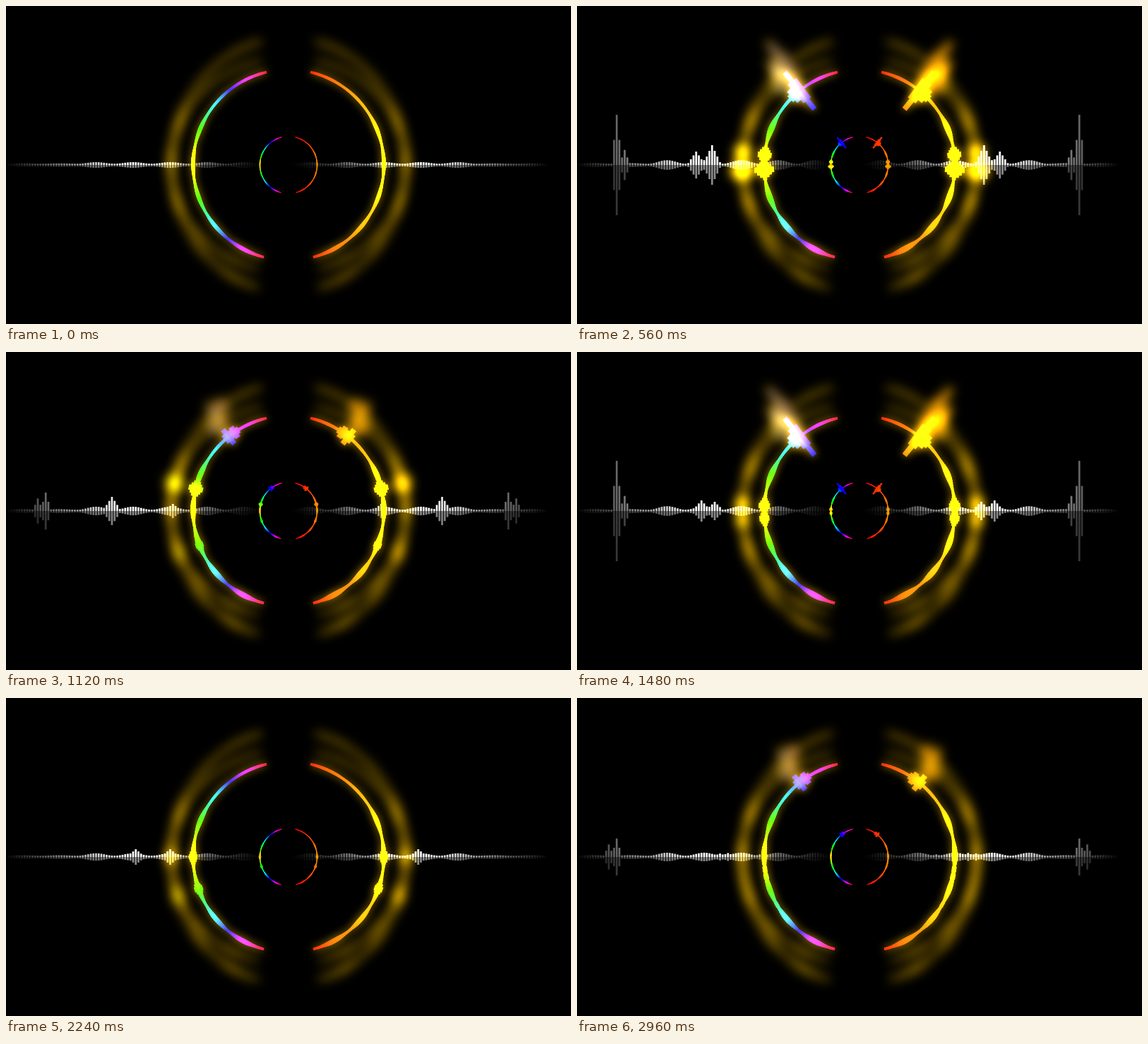
An HTML page with a canvas for the animation above (3000 ms loop, 800 by 450 pixels).

```html
<!DOCTYPE html>
<html lang="en">
<head>
<meta charset="utf-8">
<title>Spectrum rings</title>
<style>
html, body { margin: 0; width: 100%; height: 100%; overflow: hidden; background: #000; }
canvas { display: block; width: 800px; height: 450px; }
</style>
</head>
<body>
<canvas id="stage" width="800" height="450"></canvas>
<script>
const W = 800, H = 450, LOOP = 3000, STEP = 40;
const BARS = 100, PITCH = 3.75, RADIUS = 135, REST = 1.8, KICK = 71;
const ctx = document.getElementById('stage').getContext('2d');
const buffer = Object.assign(document.createElement('canvas'), { width: W, height: H });
const off = buffer.getContext('2d');

const clamp = v => Math.max(0, Math.min(1, v));
const beats = Array.from({ length: 7 }, (_, n) => STEP * Math.round((110 + 453 * n) / STEP));

function random(a, b) {
  const v = Math.sin(a * 127.1 + b * 311.7) * 43758.5453;
  return v - Math.floor(v);
}

// Melody: time, bar, height
const notes = [
  [560, 51, 28], [560, 45, 19], [1120, 40, 20], [1120, 63, 10],
  [1480, 47, 15], [1480, 52, 13], [1920, 61, 18], [1920, 65, 16],
  [2240, 49, 11], [2240, 62, 11]
];
// Softer notes between the beats
beats.forEach((b, n) => {
  for (let k = 0; k < 3; k++)
    notes.push([b + 200, 33 + 3 * Math.floor(13 * random(n, k)), 8 + 14 * random(k, n + 9)]);
});

function kick(e) {
  if (e >= 240) return [];
  const late = clamp(e / 120);
  return [
    [12, KICK * 0.25 * late, 2],
    [15, KICK / (1 + e / 70), 2],
    [18, KICK * 0.3 * (1 - late), 2]
  ];
}

function spectrum(t) {
  const sinceBeat = t - Math.max(-LOOP, ...beats.filter(b => b <= t));
  const loud = 0.45 + 0.55 * Math.exp(-sinceBeat / 400);
  const peaks = kick(sinceBeat);
  for (const [at, bar, h] of notes)
    peaks.push([bar, h * clamp(1 - Math.abs(t - at) / 110), 3.5]);
  return Array.from({ length: BARS }, (_, n) => {
    const i = n - 1;
    const swell = (i < 27 ? 1 : 5) * loud * Math.cos(Math.PI * (i - 76) / 14) ** 2;
    return Math.max(REST + swell, ...peaks.map(([c, h, w]) => h * (1 - Math.abs(i - c) / w)));
  });
}

// Colours by side and by distance from the horizontal, 0 to 1
const hue = (h, light = 50) => `hsl(${h},100%,${light}%)`;
const gold = () => '#ffc400';
const mainColor = (side, a) => hue(side < 0 ? 55 + 297 * a ** 1.2 : 53 * (1 - a ** 1.5), 53);
const smallColor = (side, a) => hue(side < 0 ? 42 + 303 * a : 38 * (1 - a));

function ring(g, bars, color, sx, sy, trim = 0) {
  for (const side of [-1, 1]) {
    bars.forEach((h, n) => {
      const half = 1 + 0.46 * h - trim;
      if (half <= 0) return;
      const deg = 14.9 + n * 1.5;
      g.save();
      g.translate(W / 2, H / 2);
      g.scale(sx, sy);
      g.rotate(side * deg * Math.PI / 180);
      g.fillStyle = color(side, clamp(Math.abs(90 - deg) / 76));
      g.fillRect(-3.8, -RADIUS - half, 7.6, 2 * half);
      g.restore();
    });
  }
}

function glow(bars, color, sx, sy, blur, alpha, trim) {
  off.clearRect(0, 0, W, H);
  ring(off, bars, color, sx, sy, trim);
  ctx.save();
  ctx.globalCompositeOperation = 'lighter';
  ctx.globalAlpha = alpha;
  ctx.filter = `blur(${blur}px)`;
  ctx.drawImage(buffer, 0, 0);
  ctx.restore();
}

function line(bars) {
  ctx.fillStyle = '#fff';
  bars.forEach((h, n) => {
    const x = (n - 1) * PITCH;
    const alpha = clamp(x / 165) ** 0.85 * clamp((366 - x) / 154) ** 1.3;
    for (const cx of [x, 767.5 - x]) {
      ctx.globalAlpha = alpha;
      ctx.fillRect(cx - 1.35, 225 - h, 2.7, h);
      ctx.globalAlpha = alpha * 0.55;
      ctx.fillRect(cx - 1.35, 225, 2.7, h);
    }
  });
  ctx.globalAlpha = 1;
}

function draw(t) {
  const bars = spectrum(t);
  ctx.fillStyle = '#000';
  ctx.fillRect(0, 0, W, H);
  line(bars);
  ring(ctx, bars, mainColor, 1, 1);
  ring(ctx, bars, smallColor, 0.3, 0.3);
  glow(bars, gold, 1, 1, 6, 0.75);
  for (const sy of [1.12, 1.33]) {
    glow(bars, gold, 1.23, sy, 8, 0.6);
    glow(bars, mainColor, 1.23, sy, 7, 0.3, 4.5);
  }
}

const start = performance.now();
function tick() {
  const t = (performance.now() - start) % LOOP;
  draw(Math.floor(t / STEP) * STEP);
  requestAnimationFrame(tick);
}
tick();
</script>
</body>
</html>
```
